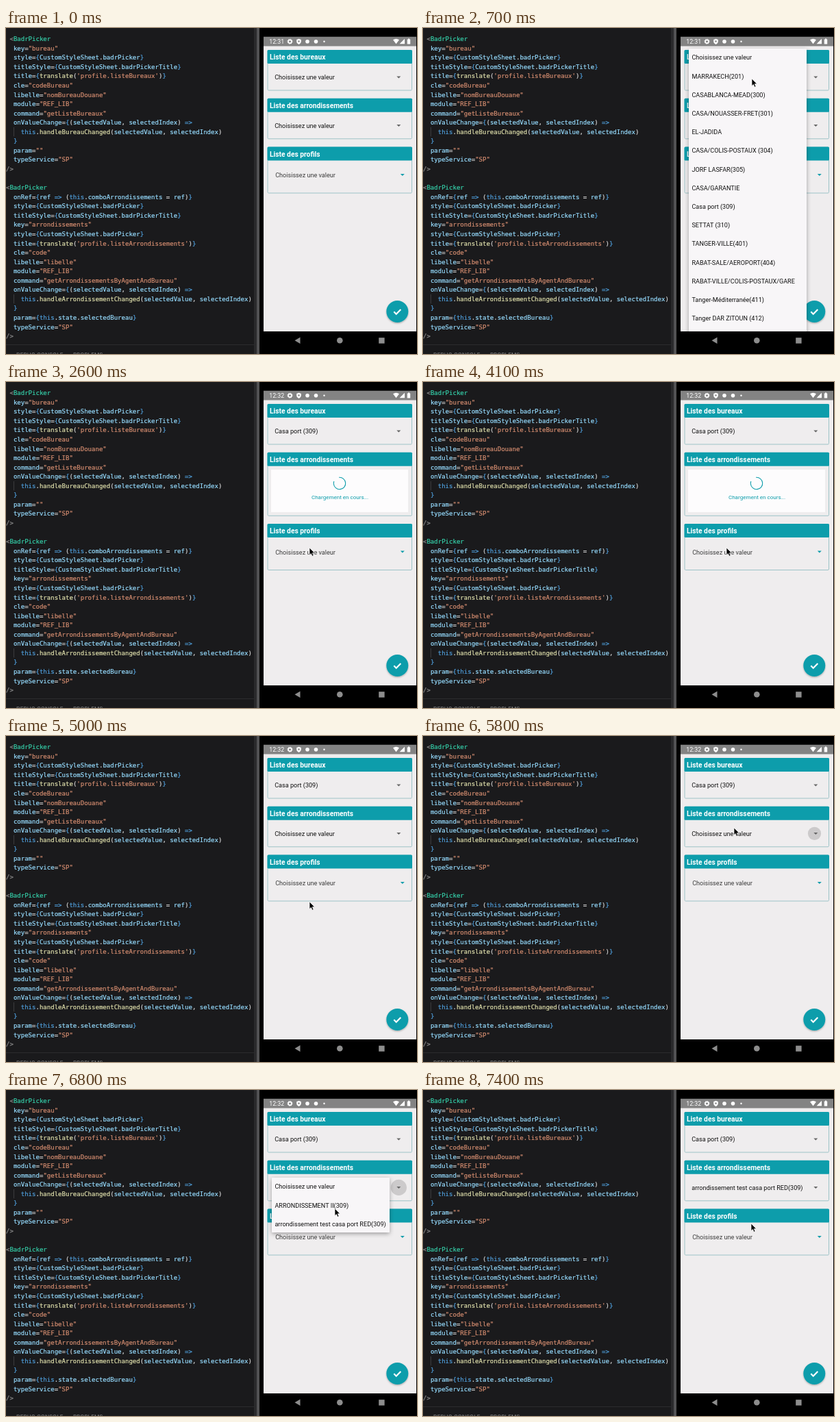
Write an HTML page that moves like this. It is 600 by 476 pixels and loops after 8 s.

```html
<!DOCTYPE html>
<html lang="fr">
<head>
<meta charset="utf-8">
<title>Listes liées</title>
<style>
html, body { margin: 0; width: 100%; height: 100%; overflow: hidden; background: #000; }
svg { display: block; width: 600px; height: 476px; }
text { white-space: pre; }
.code { font: 9.04px "DejaVu Sans Mono", "Liberation Mono", monospace; fill: #d4d4d4; stroke-width: .2; }
.tab { font: 8px Inter, "Open Sans", sans-serif; fill: #8c8c8c; }
.ui { font: 9.1px Roboto, sans-serif; fill: #111; }
.head { font: bold 10.25px Roboto, sans-serif; fill: #fff; }
.wait { font: 8.05px Roboto, sans-serif; fill: #0d9dab; }
</style>
</head>
<body>
<svg id="stage" viewBox="0 0 600 476" xmlns="http://www.w3.org/2000/svg">
  <defs>
    <filter id="shadow" x="-20%" y="-20%" width="140%" height="150%">
      <feDropShadow dx="0" dy="2" stdDeviation="3" flood-color="#000" flood-opacity=".34"/>
    </filter>
    <filter id="lift" x="-30%" y="-30%" width="160%" height="160%">
      <feDropShadow dx="0" dy="1.2" stdDeviation="1.3" flood-color="#000" flood-opacity=".3"/>
    </filter>
    <clipPath id="screen"><rect x="376" y="12.5" width="223" height="430.5"/></clipPath>
    <clipPath id="list"><rect x="388" y="30" width="172" height="413"/></clipPath>
  </defs>
</svg>
<script>
const LOOP = 8000, STEP = 100, TEAL = '#0d9dab', ROW = 27.2;
const stage = document.getElementById('stage');

function add(parent, tag, attrs = {}, content) {
  const node = document.createElementNS('http://www.w3.org/2000/svg', tag);
  for (const key in attrs) node.setAttribute(key, attrs[key]);
  if (content !== undefined) node.textContent = content;
  return parent.appendChild(node);
}
const group = (parent, attrs) => add(parent, 'g', attrs);
const rect = (parent, x, y, width, height, fill, more) =>
  add(parent, 'rect', { x, y, width, height, fill, ...more });
const path = (parent, d, fill, more) => add(parent, 'path', { d, fill, ...more });
const circle = (parent, cx, cy, r, fill, more) =>
  add(parent, 'circle', { cx, cy, r, fill, ...more });
const label = (parent, x, y, content, cls = 'ui', more) =>
  add(parent, 'text', { x, y, class: cls, ...more }, content);
const show = (node, on) => node.setAttribute('display', on ? 'inline' : 'none');

// Smooth progress from 0 to 1 while t runs from a to b
function ease(t, a, b) {
  const p = Math.min(1, Math.max(0, (t - a) / (b - a)));
  return p * p * (3 - 2 * p);
}

// Code editor
const code = ` <BadrPicker
  key="bureau"
  style={CustomStyleSheet.badrPicker}
  titleStyle={CustomStyleSheet.badrPickerTitle}
  title={translate('profile.listeBureaux')}
  cle="codeBureau"
  libelle="nomBureauDouane"
  module="REF_LIB"
  command="getListeBureaux"
  onValueChange={(selectedValue, selectedIndex) =>
    this.handleBureauChanged(selectedValue, selectedIndex)
  }
  param=""
  typeService="SP"
/>

<BadrPicker
  onRef={ref => (this.comboArrondissements = ref)}
  style={CustomStyleSheet.badrPicker}
  titleStyle={CustomStyleSheet.badrPickerTitle}
  key="arrondissements"
  style={CustomStyleSheet.badrPicker}
  title={translate('profile.listeArrondissements')}
  cle="code"
  libelle="libelle"
  module="REF_LIB"
  command="getArrondissementsByAgentAndBureau"
  onValueChange={(selectedValue, selectedIndex) =>
    this.handleArrondissementChanged(selectedValue, selectedIndex)
  }
  param={this.state.selectedBureau}
  typeService="SP"
/>`;
const syntax = [
  [/^["']/, '#d58d70'],
  [/^(this|=>|[{}])$/, '#4f9fdc'],
  [/^BadrPicker$/, '#35d0aa'],
  [/^(<|\/>)$/, '#8a8a8a'],
  [/^(translate|handle\w+)$/, '#e0e0ac'],
  [/^\w/, '#96dcff'],
  [/./, '#d8d8d8']
];

function drawEditor() {
  rect(stage, 0, 0, 363, 476, '#1a1a1c');
  rect(stage, 362, 0, 4, 476, '#2a2a2c');
  rect(stage, 366, 0, 4, 476, '#525254');
  code.split('\n').forEach((line, i) => {
    const y = 19.2 + i * 13.56;
    if (line.startsWith('    ')) rect(stage, 11, y - 10, 1, 13.5, '#3c3c3e');
    const row = label(stage, 0, y, '', 'code');
    for (const token of line.match(/"[^"]*"|'[^']*'|=>|\/>|\w+|\s+|./g) || []) {
      const fill = syntax.find(([test]) => test.test(token))[1];
      add(row, 'tspan', { fill, stroke: fill }, token);
    }
  });
  rect(stage, 0, 462, 362, 1, '#2c2c2e');
  label(stage, 15, 479.7, 'DEBUG CONSOLE', 'tab');
  label(stage, 98, 479.7, 'PROBLEMS', 'tab');
}

// Phone
function drawStatus(parent) {
  rect(parent, 376, 12.5, 223, 14, '#838383');
  const clock = label(parent, 384.2, 23, '', 'ui', { style: 'fill:#fff;font-size:8.8px' });
  circle(parent, 414.5, 19.7, 2.4, 'none', { stroke: '#fff', 'stroke-width': 1.7 });
  circle(parent, 414.5, 19.7, 3.5, 'none',
    { stroke: '#fff', 'stroke-width': 1, 'stroke-dasharray': '1.4 1.35' });
  path(parent, 'M427.5 15.8l3.3 1.3v2.4q0 3-3.3 4.4q-3.3-1.4-3.3-4.4v-2.4z', '#fff');
  circle(parent, 427.5, 19.5, 1.2, '#838383');
  circle(parent, 440, 19.7, 2.8, '#fff');
  circle(parent, 452.5, 19.7, 2.8, '#fff');
  circle(parent, 464.5, 19.7, 1.2, '#fff');
  path(parent, 'M565 17.3q4.5-3 9 0l-4.5 6z', '#fff');
  path(parent, 'M582 15.8v7.4h-7.4z', '#fff');
  path(parent, 'M585.8 16.6h1.2v-1h2v1h1.2v6.8h-4.4z', '#fff');
  return clock;
}

function card(parent, y, height, title) {
  rect(parent, 382, y + .5, 210.5, height - 1, '#efedee',
    { rx: 1.5, stroke: '#9dc3c7', 'stroke-width': 1 });
  rect(parent, 381.5, y, 211.5, 20, TEAL, { rx: 1.5 });
  label(parent, 385, y + 14.2, title, 'head');
}
const arrow = (parent, x, y, fill) => path(parent, `M${x - 3} ${y - 1.5}h6l-3 3z`, fill);

function popup(y, height, items) {
  const node = group(screen);
  rect(node, 388, y, 172, height, '#f8f6f8', { rx: 1, filter: 'url(#shadow)' });
  const rows = group(group(node, { 'clip-path': y < 100 ? 'url(#list)' : 'none' }));
  items.forEach((item, i) => label(rows, 392.4, y + 16.4 + i * ROW, item));
  return { node, rows };
}

drawEditor();
const screen = group(stage, { 'clip-path': 'url(#screen)' });
rect(screen, 376, 13, 223, 430, '#efedee');
const clock = drawStatus(screen);

card(screen, 32, 59.5, 'Liste des bureaux');
const office = label(screen, 392.2, 75.3, '');
arrow(screen, 573.3, 72, '#666');

const ready = group(screen);
card(ready, 102.8, 59.5, 'Liste des arrondissements');
const ripple = circle(ready, 0, 0, 0, '#cccacb');
const district = label(ready, 392.2, 145.8, '');
arrow(ready, 573.3, 142.5, '#666');

const loading = group(screen);
card(loading, 102.8, 93, 'Liste des arrondissements');
rect(loading, 387, 128, 200, 62, '#fdfcfd');
const spinner = circle(loading, 487, 148, 8.7, 'none',
  { stroke: TEAL, 'stroke-width': 1.1, pathLength: 360 });
label(loading, 487.5, 171, 'Chargement en cours...', 'wait', { 'text-anchor': 'middle' });

const profiles = group(screen);
card(profiles, 173.5, 68, 'Liste des profils');
label(profiles, 393.2, 218, 'Choisissez une valeur', 'ui', { style: 'fill:#3c3c3c' });
arrow(profiles, 578.8, 214.5, TEAL);

circle(screen, 571.3, 414, 16, TEAL, { filter: 'url(#lift)' });
path(screen, 'M566.3 414.3l3.4 3.4l6.6-6.8', 'none', { stroke: '#fff', 'stroke-width': 2.2 });

const offices = popup(30, 420, [
  'Choisissez une valeur',
  'MARRAKECH(201)', 'CASABLANCA-MEAD(300)', 'CASA/NOUASSER-FRET(301)', 'EL-JADIDA',
  'CASA/COLIS-POSTAUX (304)', 'JORF LASFAR(305)', 'CASA/GARANTIE', 'Casa port (309)',
  'SETTAT (310)', 'TANGER-VILLE(401)', 'RABAT-SALE/AEROPORT(404)',
  'RABAT-VILLE/COLIS-POSTAUX/GARE', 'Tanger-Méditerranée(411)',
  'Tanger DAR ZITOUN (412)', 'FES VILLE (500)'
]);
const districts = popup(128, 80, [
  'Choisissez une valeur', 'ARRONDISSEMENT II(309)', 'arrondissement test casa port RED(309)'
]);

path(stage, 'M429.5 451.5v9.5l-8-4.75z', '#8d8d8d');
circle(stage, 487.3, 456.3, 4.3, '#8d8d8d');
rect(stage, 544.2, 452.2, 8.4, 8.4, '#8d8d8d');

const cursor = path(stage, 'M0 0v10.6l2.4-2.2l1.7 3.9l1.9-.8l-1.7-3.8h3.3z', '#000',
  { stroke: '#fff', 'stroke-width': .7 });

// Time, x, y of the pointer
const route = [
  [300, 490, 95], [500, 480, 74], [800, 480, 74], [1400, 443, 242],
  [5000, 443, 242], [5600, 454, 134], [6400, 454, 134], [6800, 480, 173],
  [7000, 479, 195], [LOOP, 479, 195]
];
function pointerAt(t) {
  const i = Math.max(1, route.findIndex(stop => stop[0] > t));
  const [t0, x0, y0] = route[i - 1], [t1, x1, y1] = route[i];
  const e = ease(t, t0, t1);
  return [x0 + (x1 - x0) * e, y0 + (y1 - y0) * e];
}

// The arc grows at its head, then shrinks at its tail, one turn per cycle
function turnSpinner(t) {
  const p = ((t - 1850) / 1500 + 1) % 1;
  const head = 280 * ease(p, 0, .5), tail = 280 * ease(p, .5, 1);
  const arc = 15 + head - tail;
  spinner.setAttribute('stroke-dasharray', `${arc} ${360 - arc}`);
  spinner.setAttribute('transform', `rotate(${80 * p + tail - 135} 487 148)`);
}

function draw(t) {
  const within = (from, to) => t >= from && t < to;
  const busy = within(2000, 4900);
  clock.textContent = t < 800 ? '12:31' : '12:32';
  office.textContent = t < 2000 ? 'Choisissez une valeur' : 'Casa port (309)';
  district.textContent = t < 7100 ? 'Choisissez une valeur' : 'arrondissement test casa port RED(309)';
  show(offices.node, within(600, 2000));
  offices.rows.setAttribute('transform', `translate(0 ${-18.3 * ease(t, 900, 1300)})`);
  show(districts.node, within(6400, 7100));
  show(loading, busy);
  show(ready, !busy);
  profiles.setAttribute('transform', `translate(0 ${busy ? 33.5 : 0})`);
  turnSpinner(t);

  const wide = t >= 6400;
  show(ripple, within(5700, 7100));
  ripple.setAttribute('cx', wide ? 573.3 : 571.5);
  ripple.setAttribute('cy', 142.4);
  ripple.setAttribute('r', wide ? 11.6 : 9.6);

  show(cursor, t >= 300);
  cursor.setAttribute('transform', `translate(${pointerAt(t)})`);
}

const start = performance.now();
function tick() {
  const t = (performance.now() - start) % LOOP;
  draw(Math.floor(t / STEP) * STEP);
  requestAnimationFrame(tick);
}
tick();
</script>
</body>
</html>
```
